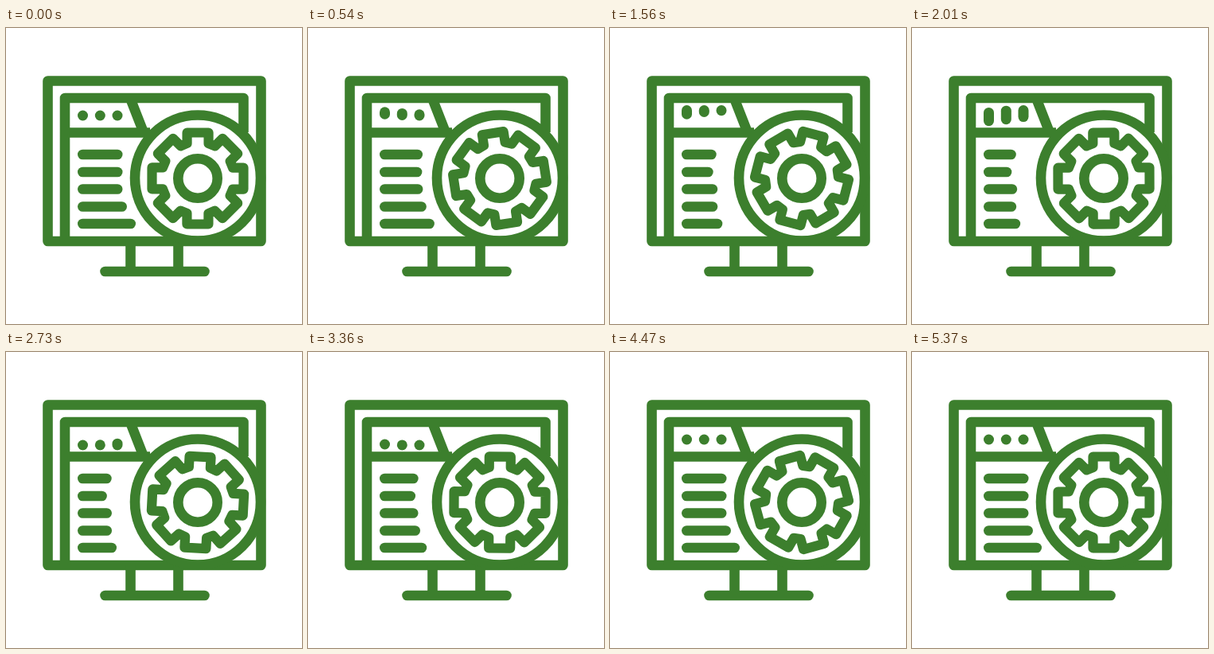
An HTML page that plays this animation: 372 px wide and 372 px high, repeating every 5.4 s.

```html
<!DOCTYPE html>
<html lang="en">
<head>
<meta charset="utf-8">
<title>Monitor with turning gear</title>
<style>
  html, body { margin: 0; width: 100%; height: 100%; overflow: hidden; background: #fff; }
  svg { display: block; width: 100vw; height: 100vh; }
</style>
</head>
<body>
<svg viewBox="0 0 372 372" fill="none" stroke="#3c7f2d" stroke-width="12.6" stroke-linejoin="round">
  <rect x="52.5" y="66.5" width="268" height="201.5"/>
  <path d="M74 268V88H298.5V131M74 131.5H181M156 88L173 131.5M156.5 268V306M216.5 268V306"/>
  <path d="M124.5 306H249.5" stroke-linecap="round"/>
  <circle cx="241" cy="188.5" r="79"/>
  <circle cx="241" cy="189" r="24.7"/>
  <path id="gear" stroke-width="12.2"/>
  <g id="bars" stroke-linecap="round"></g>
  <g id="dots" stroke="none" fill="#3c7f2d"></g>
</svg>
<script>
const LOOP = 5400, LAST = 5370;
const $ = id => document.getElementById(id);
const add = (parent, tag) =>
  parent.appendChild(document.createElementNS('http://www.w3.org/2000/svg', tag));

// Smooth 0..1 ramp from start lasting span
const ramp = (t, start, span) => {
  const x = Math.min(1, Math.max(0, (t - start) / span));
  return x * x * (3 - 2 * x);
};

// Eight equal teeth around the origin
const tooth = [[-13.5, -44], [-13.5, -57.5], [13.5, -57.5], [13.5, -44]];
const outline = [];
for (let i = 0; i < 8; i++) {
  const c = Math.cos(i * Math.PI / 4), s = Math.sin(i * Math.PI / 4);
  for (const [x, y] of tooth) outline.push([x * c - y * s, x * s + y * c]);
}
$('gear').setAttribute('d', 'M' + outline.join('L') + 'Z');

// y, longest right end, shortest right end, time of the shortest
const bars = [
  [159, 146.5, 130.5, 2190],
  [181, 146.5, 124.5, 2280],
  [202.5, 146.5, 131.5, 2310],
  [224.5, 152, 130.5, 2250],
  [246, 163, 135.5, 2220]
].map(([y, long, short, mid]) => ({ y, long, short, mid, el: add($('bars'), 'path') }));
const BARS_END = 4500;

const dots = [96.5, 118.3, 140].map((x, i) => {
  const el = add($('dots'), 'rect');
  el.setAttribute('x', x - 6.5);
  el.setAttribute('width', 13);
  el.setAttribute('rx', 6.5);
  return { el, delay: i * 150 };
});

// Height of a dot's edge: up, down past rest, then back
const edge = (t, up, down) =>
  110 - 6.5 * ramp(t, up, 900) + 13.5 * ramp(t, down, 900) - 7 * ramp(t, 3150, 900);

function draw(t) {
  $('gear').setAttribute('transform',
    `translate(241 189) rotate(${360 * Math.min(1, t / LAST)})`);

  for (const { y, long, short, mid, el } of bars) {
    const shrink = ramp(t, 0, mid) - ramp(t, mid, BARS_END - mid);
    const right = long + (short - long) * shrink;
    el.setAttribute('d', `M96.3 ${y}H${right - 6.3}`);
  }

  for (const { el, delay } of dots) {
    const top = edge(t - delay, 0, 1740) - 6.5;
    const bottom = edge(t - delay, 225, 1200) + 6.5;
    el.setAttribute('y', top);
    el.setAttribute('height', bottom - top);
  }
}

const start = performance.now();
function tick() {
  draw((performance.now() - start) % LOOP);
  requestAnimationFrame(tick);
}
tick();
</script>
</body>
</html>
```
